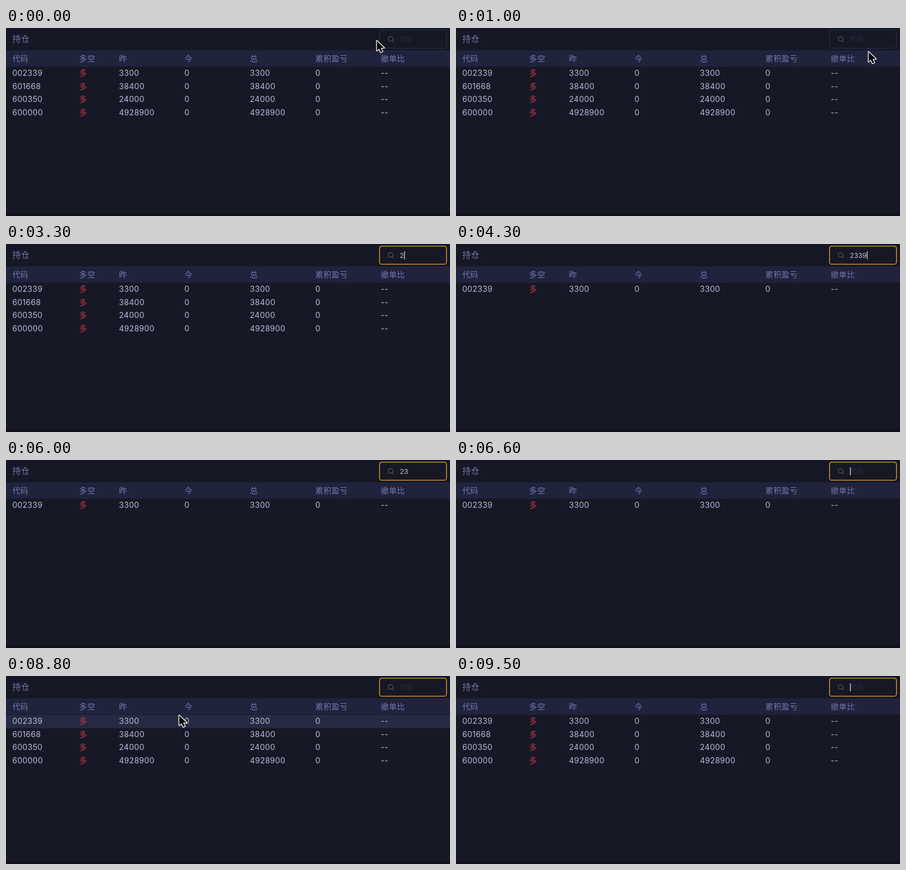
Write an HTML page with a canvas that moves like this. It is 792 px wide and 338 px high and loops after 9.7 s.

```html
<!DOCTYPE html>
<html lang="zh">
<head>
<meta charset="utf-8">
<style>
  html, body { margin: 0; height: 100%; overflow: hidden; background: #161825; }
  canvas { display: block; }
</style>
</head>
<body>
<canvas width="792" height="338"></canvas>
<script>
const ctx = document.querySelector('canvas').getContext('2d');
const LOOP = 9700, STEP = 100, FILTER_DELAY = 400;
const ROW_TOP = 70, ROW_HEIGHT = 23.65;
const FONT = 'Inter, "Noto Sans CJK SC", "Noto Sans CJK", sans-serif';
const CJK = '"Noto Sans CJK SC", "Noto Sans CJK", sans-serif';

const columns = [11.2, 130.5, 201.5, 318.2, 435, 551.8, 668.5];
const headers = ['代码', '多空', '昨', '今', '总', '累积盈亏', '撤单比'];
const holdings = [['002339', '3300'], ['601668', '38400'], ['600350', '24000'], ['600000', '4928900']];

// [time, query]
const typing = [[0, ''], [3300, '2'], [3600, '23'], [3700, '233'], [4200, '2339'],
  [5700, '233'], [6000, '23'], [6200, '2'], [6300, '']];
// Each entry flips the caret, which starts hidden.
const blinks = [1500, 2000, 2400, 2900, 3300, 4800, 5300, 6000, 6200, 6700, 7200, 7800, 8300, 8700, 9200];
// Pointer strokes of [time, x, y]; the pointer is hidden between them.
const strokes = [
  [[0, 660.5, 22], [100, 660.5, 22], [400, 662, 42], [1000, 735, 42], [1100, 732, 30],
    [1700, 731, 23.5], [2800, 731, 23.5], [2900, 731, 27], [3200, 731, 29]],
  [[7800, 731, 29], [8000, 740, 40], [8600, 740, 40], [8700, 560, 58], [8800, 308, 70]]
];

const clamp = v => Math.max(0, Math.min(1, v));
const queryAt = t => typing.findLast(([start]) => start <= Math.max(0, t))[1];

function pointerAt(t) {
  const keys = strokes.find(s => t >= s[0][0] && t <= s.at(-1)[0]);
  if (!keys) return null;
  const i = Math.max(1, keys.findIndex(k => k[0] >= t));
  const [t0, x0, y0] = keys[i - 1], [t1, x1, y1] = keys[i];
  const p = (t - t0) / (t1 - t0);
  return { x: x0 + (x1 - x0) * p, y: y0 + (y1 - y0) * p };
}

function rect(x, y, w, h, color) {
  ctx.fillStyle = color;
  ctx.fillRect(x, y, w, h);
}

function text(str, x, y, color, size = 14, spacing = 0.3, family = FONT, weight = 400) {
  ctx.font = `${weight} ${size}px ${family}`;
  ctx.letterSpacing = spacing + 'px';
  ctx.fillStyle = color;
  ctx.fillText(str, x, y);
}

const han = (str, x, y, color, size, spacing = 0.4) => text(str, x, y, color, size, spacing, CJK, 300);

function drawTable(query, pointer) {
  rect(0, 40, 792, 29.5, '#1f233c');
  headers.forEach((h, i) => han(h, columns[i], 60, '#7477ac'));
  holdings.filter(([code]) => code.includes(query)).forEach(([code, amount], i) => {
    const top = ROW_TOP + i * ROW_HEIGHT, base = Math.round(top + 16.1);
    if (pointer && pointer.y >= top && pointer.y < top + ROW_HEIGHT) {
      rect(0, top, 792, ROW_HEIGHT, '#272a43');
    }
    [code, '多', amount, '0', amount, '0', '--'].forEach((cell, c) => {
      if (c === 1) han(cell, columns[c], base, '#c4364b');
      else text(cell, columns[c], base, '#b8badb');
    });
  });
}

function drawSearch(t, query) {
  const focus = clamp((t - 1100) / 400);
  const mix = (a, b) => a + (b - a) * focus;
  ctx.strokeStyle = `rgb(${mix(42, 238)}, ${mix(44, 165)}, ${mix(70, 50)})`;
  ctx.lineWidth = 1.3;
  ctx.beginPath();
  ctx.roundRect(666.4, 3.9, 119.3, 32.5, 4);
  ctx.stroke();

  ctx.strokeStyle = '#65688f';
  ctx.lineWidth = 1;
  ctx.beginPath();
  ctx.arc(686.2, 19.7, 4.1, 0, 7);
  ctx.moveTo(689.2, 22.7);
  ctx.lineTo(692, 25.5);
  ctx.stroke();

  if (query) text(query, 702.5, 25, '#c0c2df', 12, 0.1);
  else han('代码', 702.5, 25, '#2a2c42', 12, 0);
  if (blinks.filter(b => b <= t).length % 2) {
    ctx.font = `12px ${FONT}`;
    ctx.letterSpacing = '0.1px';
    rect(702.8 + ctx.measureText(query).width, 13, 1.3, 14.5, '#d0d2e8');
  }
}

function drawPointer({ x, y }) {
  const overInput = x > 666 && x < 786 && y > 4 && y < 37;
  ctx.save();
  ctx.translate(x, y);
  ctx.lineJoin = ctx.lineCap = 'round';
  if (overInput) {
    const beam = new Path2D('M-3.5-8.2Q0-8.2 0-5.7Q0-8.2 3.5-8.2M0-5.7V5.7M-3.5 8.2Q0 8.2 0 5.7Q0 8.2 3.5 8.2M-2 3H2');
    for (const [color, width] of [['#fff', 3.8], ['#111', 1.3]]) {
      ctx.strokeStyle = color;
      ctx.lineWidth = width;
      ctx.stroke(beam);
    }
  } else {
    const arrow = new Path2D('M1 1V18.6L5 14.9L7.8 21.5L11 20.2L8.2 13.7H14Z');
    ctx.strokeStyle = '#fff';
    ctx.lineWidth = 2.6;
    ctx.stroke(arrow);
    ctx.fillStyle = '#08080c';
    ctx.fill(arrow);
  }
  ctx.restore();
}

function draw(now) {
  const t = Math.floor(now % LOOP / STEP) * STEP;
  const pointer = pointerAt(t);
  rect(0, 0, 792, 338, '#161825');
  rect(0, 333, 792, 5, '#0e0f1b');
  han('持仓', 11.2, 25, '#7477ac', 15, 0.5);
  drawTable(queryAt(t - FILTER_DELAY), pointer);
  drawSearch(t, queryAt(t));
  if (pointer) drawPointer(pointer);
}

const start = performance.now();
(function frame() {
  draw(performance.now() - start);
  requestAnimationFrame(frame);
})();
</script>
</body>
</html>
```
